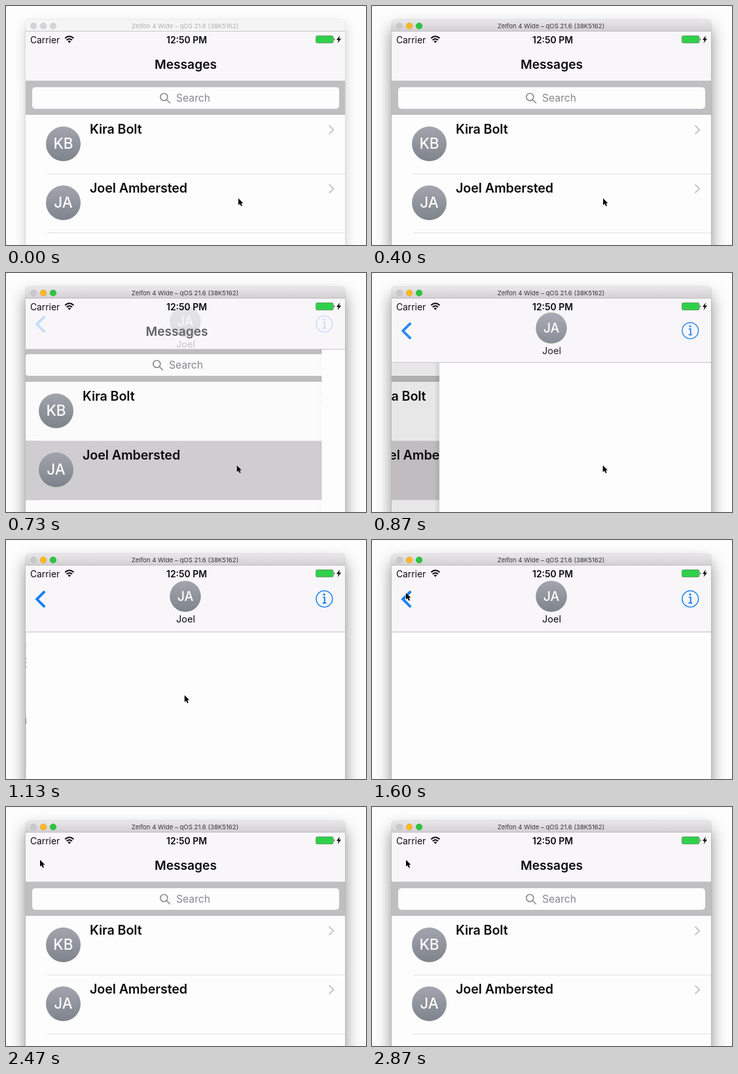
An HTML page that plays this animation: 550x365 px, repeating every 2940 ms.

```html
<!DOCTYPE html>
<html lang="en">
<head>
<meta charset="utf-8">
<title>Message list</title>
<style>
  html, body { margin: 0; width: 100%; height: 100%; overflow: hidden; background: #fdfdfe; }
  #stage { position: relative; width: 550px; height: 365px; overflow: hidden; --q: 0; }
  #shadow {
    position: absolute; left: 30px; top: 21px; width: 488px; height: 480px;
    border-radius: 5px 5px 0 0;
    box-shadow: 0 8px 18px rgba(0,0,0,.2), 0 0 1px rgba(0,0,0,.45);
  }
  .active #shadow { box-shadow: 0 13px 24px rgba(0,0,0,.46), 0 0 1px rgba(0,0,0,.6); }
  svg { position: absolute; left: 0; top: 0; display: block; }
  text { font-family: Inter, Roboto, "Liberation Sans", sans-serif; fill: #0b0b0d; }
  .mid { text-anchor: middle; }
  .bold { font-weight: 600; }
  .initials { fill: #fff; font-weight: 500; text-anchor: middle; }
  .name { font-size: 19.7px; font-weight: 600; letter-spacing: -.1px; }
  .line { fill: none; stroke-linejoin: miter; }
  .arrow { stroke: #c5c5ca; stroke-width: 2; }
  .blue { stroke: #177ef0; }

  #list { transform: translateX(calc(var(--q) * -147px)); }
  #dim { opacity: calc(var(--q) * .1); }
  #sheet { transform: translateX(calc((1 - var(--q)) * 489px)); }
  #cast { opacity: var(--q); }
  #bar { transform: translateY(calc((1 - var(--q)) * -26px)); }
  #detail { transform: translateY(calc((1 - var(--q)) * -13px)); opacity: var(--fade); }
  #heading { transform: translateX(calc(var(--q) * -180px)); opacity: calc(1 - 5 * var(--q)); }
  #pick { visibility: hidden; }
  .picked #pick { visibility: visible; }

  #chrome { fill: #f6f5f6; }
  #caption { fill: #aeadaf; font-size: 9.6px; }
  .light { fill: #d5d4d6; stroke: #c6c5c7; stroke-width: .6; }
  .active #chrome { fill: url(#metal); }
  .active #caption { fill: #363537; }
  .active .light { fill: #cbc9cc; stroke: #b8b6b9; }
  .active .yellow { fill: #fdb924; stroke: #dd9d1c; }
  .active .green { fill: #2dc63e; stroke: #20a62f; }
</style>
</head>
<body>
<div id="stage">
  <div id="shadow"></div>
  <svg width="550" height="365" viewBox="0 0 550 365">
    <defs>
      <linearGradient id="metal" x2="0" y2="1">
        <stop offset="0" stop-color="#e9e7ea"/><stop offset="1" stop-color="#d1cfd2"/>
      </linearGradient>
      <linearGradient id="slate" x2="0" y2="1">
        <stop offset="0" stop-color="#a2a5ae"/><stop offset="1" stop-color="#7e838c"/>
      </linearGradient>
      <linearGradient id="edge">
        <stop offset="0" stop-opacity="0"/><stop offset="1" stop-opacity=".12"/>
      </linearGradient>
      <clipPath id="frame"><path d="M30 365V26q0-5 5-5H513q5 0 5 5V365z"/></clipPath>
    </defs>

    <g clip-path="url(#frame)">
      <rect x="30" y="39" width="488" height="326" fill="#fefdfe"/>
      <g id="list">
        <rect id="pick" x="30" y="256" width="488" height="91" fill="#d2cfd2"/>
        <rect x="30" y="110" width="488" height="56" fill="#bfbfc1"/>
        <rect x="30" y="165" width="488" height="1" fill="#b2b2b4"/>
        <rect x="40" y="124" width="469" height="33" rx="5" fill="#fefdfe"/>
        <g class="line" stroke="#87878c" stroke-width="1.6">
          <circle cx="241.3" cy="139" r="5.5"/><path d="M245.3 143l5.5 5.5"/>
        </g>
        <text x="260" y="146" font-size="15.7" style="fill:#87878c">Search</text>
        <g id="rows"></g>
      </g>
      <rect id="dim" x="30" y="39" width="488" height="326"/>
      <g id="sheet">
        <rect id="cast" x="22" y="39" width="8" height="326" fill="url(#edge)"/>
        <rect x="30" y="39" width="489" height="326" fill="#fefdfe"/>
      </g>

      <g id="bar">
        <rect x="30" y="20" width="488" height="121" fill="#f8f6f9"/>
        <rect x="30" y="140" width="488" height="1" fill="#c3c1c4"/>
      </g>
      <text id="heading" class="mid bold" x="274.5" y="96" font-size="19.2">Messages</text>
      <g id="detail">
        <path class="line blue" stroke-width="3.9" d="M59.2 78.3L47.2 90.3L59.2 102.3"/>
        <circle cx="274" cy="86" r="23.8" fill="url(#slate)"/>
        <text class="initials" x="274" y="93" font-size="19.5">JA</text>
        <text class="mid" x="274.5" y="126.3" font-size="14.5">Joel</text>
        <circle class="line blue" cx="486.3" cy="90" r="12.4" stroke-width="1.5"/>
        <path class="line blue" stroke-width="1.9" d="M484 87.4h2.8v8.8M483.6 96.3h5.6"/>
        <circle cx="486.1" cy="83.2" r="1.6" fill="#177ef0"/>
      </g>

      <text x="37" y="56.5" font-size="13.8">Carrier</text>
      <g class="line" stroke="#0b0b0d" stroke-width="2">
        <path d="M90.2 49.2q6.6-5.8 13.2 0M92.6 52q4.2-3.6 8.4 0"/>
      </g>
      <path d="M94.4 53.8q2.4-1.8 4.8 0l-2.4 2.6z"/>
      <text class="mid bold" x="276" y="56.5" font-size="13.9">12:50 PM</text>
      <rect x="473.5" y="45.5" width="26.5" height="11" rx="2" fill="#30d04a" stroke="#5f8f68" stroke-width=".8"/>
      <path d="M501 49q2 2 0 4z" fill="#333"/>
      <path d="M510 45l-5 6.8h3l-1.4 5 5.4-7h-3.2z"/>

      <rect id="chrome" x="30" y="21" width="488" height="18"/>
      <rect x="30" y="38.3" width="488" height=".7" fill="#b5b3b6"/>
      <circle class="light" cx="42" cy="30.5" r="4.7"/>
      <circle class="light yellow" cx="57" cy="30.5" r="4.7"/>
      <circle class="light green" cx="72" cy="30.5" r="4.7"/>
      <text id="caption" class="mid" x="273.5" y="34">Zelfon 4 Wide – qOS 21.6 (38K5162)</text>
    </g>

    <path id="cursor" d="M0 0V10.4L2.4 8.2L4.2 12.1L6 11.3L4.3 7.5H7.4z"
          stroke="#fff" stroke-width="1" paint-order="stroke"/>
  </svg>
</div>
<script>
  const LOOP = 2940, STEP = 200 / 3;
  const ACTIVATE = 395, PICK = 570, PUSH = 713, POP = 1931;
  const stage = document.getElementById('stage');
  const cursor = document.getElementById('cursor');

  const row = (name, initials, y) => `
    <circle cx="87.5" cy="${y + 54.5}" r="26.5" fill="url(#slate)"/>
    <text class="initials" x="87.5" y="${y + 62.3}" font-size="22.5">${initials}</text>
    <text class="name" x="128" y="${y + 39}">${name}</text>
    <path class="line arrow" d="M493.5 ${y + 26.5}l6.8 6.5l-6.8 6.5"/>
    <rect x="63" y="${y + 100}" width="455" height="1" fill="#dddce0"/>`;
  document.getElementById('rows').innerHTML =
    row('Kira Bolt', 'KB', 156) + row('Joel Ambersted', 'JA', 246);

  // Critically damped spring from 0 to 1
  const spring = ms => {
    const x = Math.max(0, ms) * 0.022;
    return 1 - (1 + x) * Math.exp(-x);
  };
  const ease = (t, from, to) => {
    const x = Math.min(1, Math.max(0, (t - from) / (to - from)));
    return x * x * (3 - 2 * x);
  };

  function draw(t) {
    const popping = t >= POP;
    const q = popping ? 1 - spring(t - POP) : spring(t - PUSH);
    stage.style.setProperty('--q', q.toFixed(4));
    stage.style.setProperty('--fade', (popping ? q ** 1.4 : q ** 0.6).toFixed(4));
    stage.classList.toggle('active', t >= ACTIVATE);
    stage.classList.toggle('picked', t >= PICK && !popping);

    const travel = ease(t, 1065, 1267);
    const x = 355 - 2.3 * ease(t, 0, 530) - 300.7 * travel;
    const y = 293.7 - 213 * travel;
    cursor.setAttribute('transform', `translate(${x} ${y})`);
  }

  // The screen updates 15 times a second
  const start = performance.now();
  function tick() {
    const t = (performance.now() - start) % LOOP;
    draw(Math.floor((t + 5) / STEP) * STEP);
    requestAnimationFrame(tick);
  }
  tick();
</script>
</body>
</html>
```
